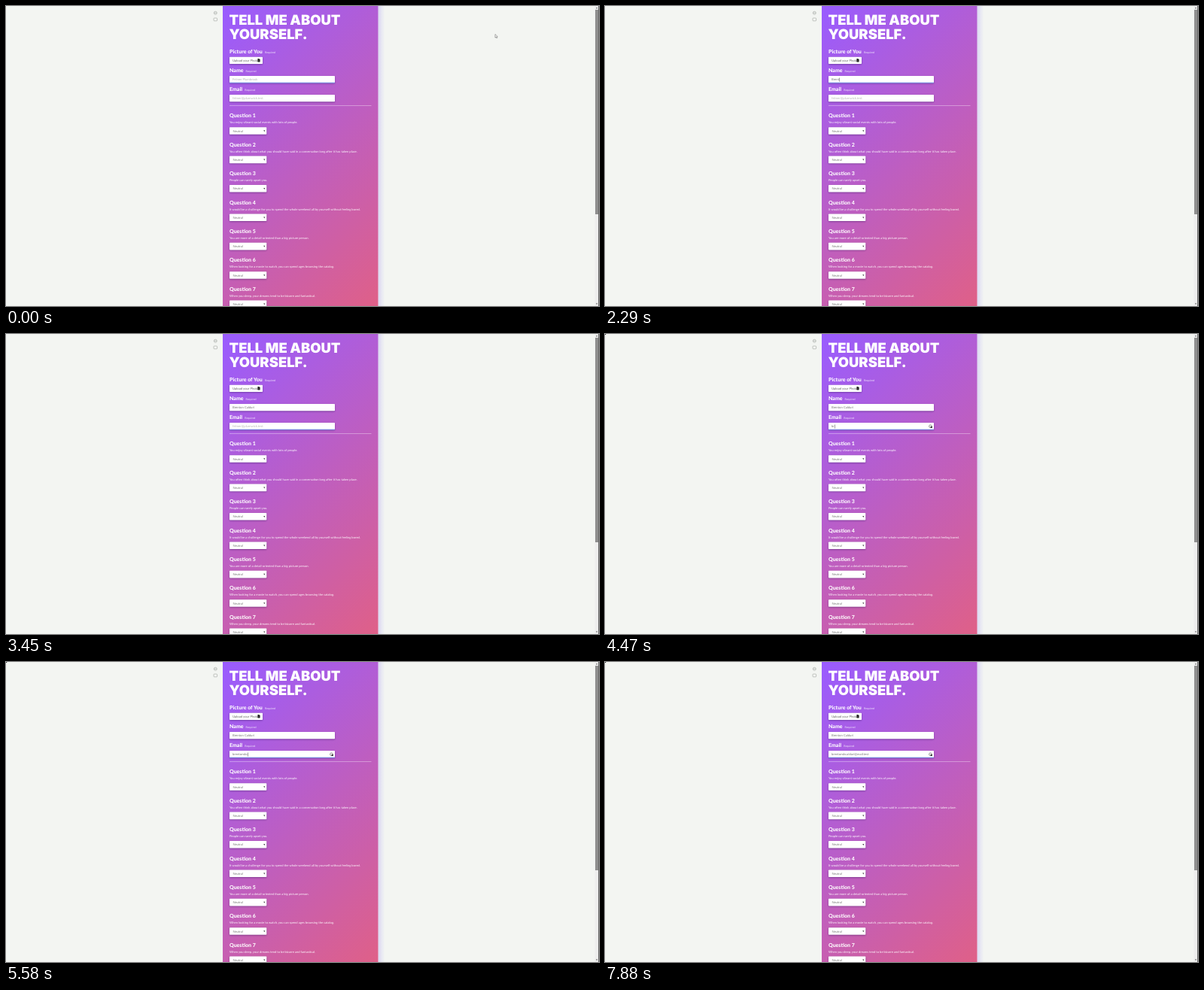
An HTML page with a canvas that plays this animation: 788 by 399 pixels, repeating every 8000 ms.

```html
<!DOCTYPE html>
<html lang="en">
<head>
<meta charset="utf-8">
<title>Tell me about yourself</title>
<style>
html, body { margin: 0; width: 100%; height: 100%; overflow: hidden; background: #f3f5f2; }
canvas { display: block; width: 788px; height: 399px; }
</style>
</head>
<body>
<canvas id="stage"></canvas>
<script>
const W = 788, H = 399, LOOP = 8000;
const PANEL = { x: 288, w: 206.5, h: 570 };
const LEFT = 297;
const BODY = 'Lato, "Open Sans", sans-serif';
const TITLE = 'Inter, "Open Sans", sans-serif';

const questions = [
  'You enjoy vibrant social events with lots of people.',
  'You often think about what you should have said in a conversation long after it has taken place.',
  'People can rarely upset you.',
  'It would be a challenge for you to spend the whole weekend all by yourself without feeling bored.',
  'You are more of a detail-oriented than a big picture person.',
  'When looking for a movie to watch, you can spend ages browsing the catalog.',
  'When you sleep, your dreams tend to be bizarre and fantastical.'
];

// Typing schedules: [time in ms, number of characters shown]
const nameField = {
  y: 93, text: 'Brenton Calduri', hint: 'Felmer Plumbrook',
  keys: [[1560, 1], [1970, 2], [2130, 4], [2290, 5], [2490, 6], [2620, 8],
         [3040, 9], [3180, 11], [3320, 13], [3450, 15]]
};
const emailField = {
  y: 118, text: 'brentonskcalduri@mail.test', hint: 'felmer@plumwick.test',
  keys: [[3950, 1], [4470, 2], [4680, 3], [4850, 5], [5020, 6], [5200, 7], [5380, 9],
         [5580, 10], [5710, 11], [5870, 13], [6030, 14], [6190, 16],
         [6590, 17], [6750, 18], [6910, 19], [7200, 21], [7330, 23], [7470, 26]]
};
const SWITCH = 3450, ICON_ON = 3950, CARET_OFF = 7880;
const moves = [[0, 0], [400, 0.16], [520, 0.48], [660, 0.8], [810, 0.97]];
const CLICK = 970, CLICK_END = 1130;

const canvas = document.getElementById('stage');
const scale = window.devicePixelRatio || 1;
canvas.width = W * scale;
canvas.height = H * scale;
const ctx = canvas.getContext('2d');

function stepAt(steps, t, start = 0) {
  let value = start;
  for (const [time, v] of steps) if (t >= time) value = v;
  return value;
}

function rect(x, y, w, h, color) {
  ctx.fillStyle = color;
  ctx.fillRect(x, y, w, h);
}

function text(str, x, y, size, color, weight = 400, family = BODY) {
  ctx.font = `${weight} ${size}px ${family}`;
  ctx.fillStyle = color;
  ctx.fillText(str, x, y);
}

function box(x, y, w, h) {
  ctx.save();
  ctx.shadowColor = 'rgba(50, 20, 90, 0.45)';
  ctx.shadowBlur = 2.5 * scale;
  ctx.shadowOffsetY = 0.9 * scale;
  ctx.fillStyle = '#fff';
  ctx.beginPath();
  ctx.roundRect(x, y, w, h, 0.8);
  ctx.fill();
  ctx.restore();
}

function path(points, fill, stroke, width = 0.5) {
  ctx.beginPath();
  points.forEach(([x, y], i) => i ? ctx.lineTo(x, y) : ctx.moveTo(x, y));
  ctx.closePath();
  if (fill) { ctx.fillStyle = fill; ctx.fill(); }
  if (stroke) { ctx.strokeStyle = stroke; ctx.lineWidth = width; ctx.stroke(); }
}

function label(str, y, noteX) {
  text(str, LEFT, y, 7, '#fff', 800);
  text('Required', noteX, y - 0.2, 3.6, 'rgba(255,255,255,0.85)');
}

function drawPanel() {
  const { x, w, h } = PANEL;
  const right = x + w;
  const shade = ctx.createLinearGradient(right, 0, right + 9, 0);
  shade.addColorStop(0, '#d9d6f2');
  shade.addColorStop(0.55, '#e9e9f3');
  shade.addColorStop(1, '#f3f5f2');
  rect(right, 0, 9, H, shade);

  // 135 degree gradient over the full form height
  const d = (w + h) / 4;
  const cx = x + w / 2, cy = h / 2;
  const fill = ctx.createLinearGradient(cx - d, cy - d, cx + d, cy + d);
  fill.addColorStop(0, '#995cff');
  fill.addColorStop(1, '#f36166');
  rect(x, 0, w, H, fill);
}

function drawChrome() {
  rect(782.5, 0, 5.5, H, '#eeeeee');
  rect(783, 5, 4, 272, '#8f8f8f');
  rect(787.2, 0, 0.8, H, '#4b4b4b');
  path([[783.8, 3.2], [785, 1.8], [786.2, 3.2]], '#555');
  path([[783.8, 395.6], [785, 397], [786.2, 395.6]], '#555');

  ctx.strokeStyle = '#aaaeaa';
  ctx.lineWidth = 0.7;
  ctx.beginPath();
  ctx.arc(278.3, 9.2, 2, 0, Math.PI * 2);
  ctx.moveTo(276.5, 9.2);
  ctx.lineTo(280.1, 9.2);
  ctx.stroke();
  ctx.beginPath();
  ctx.roundRect(276, 16, 4.6, 3.8, 0.8);
  ctx.stroke();
}

function drawForm() {
  text('TELL ME ABOUT', 296.5, 25, 18.4, '#fff', 900, TITLE);
  text('YOURSELF.', 296.5, 44, 18.4, '#fff', 900, TITLE);

  label('Picture of You', 63, 344);
  box(LEFT, 67.7, 44, 9.4);
  text('Upload your Photo', 301, 74, 4.2, '#666');
  path([[334.4, 70], [336.4, 70], [337.6, 71.2], [337.6, 74.6], [334.4, 74.6]], '#2a2a2a');
  label('Name', 88.2, 318.5);
  label('Email', 113.2, 317.3);
  rect(LEFT, 132, 188.5, 0.7, 'rgba(255,255,255,0.5)');

  questions.forEach((q, i) => {
    const y = 146 + i * 38.4;
    text(`Question ${i + 1}`, LEFT, y + 2.4, 7, '#fff', 800);
    text(q, LEFT, y + 10.4, 4.1, 'rgba(255,255,255,0.95)');
    box(LEFT, y + 15.2, 49.3, 9.6);
    text('Neutral', 301.4, y + 21.5, 4.1, '#777');
    path([[342.2, y + 19.2], [344.4, y + 19.2], [343.3, y + 21.2]], '#444');
  });
}

function drawField(field, t, focused) {
  const { y } = field;
  const count = stepAt(field.keys, t);
  box(LEFT, y, 140, 9.3);
  if (focused) rect(LEFT, y + 8.7, 140, 0.8, '#5b7fe8');

  const shown = count ? field.text.slice(0, count) : field.hint;
  text(shown, 301, y + 6.1, 4.2, count ? '#777' : '#b8b8b8');
  if (focused && count && t < CARET_OFF) {
    rect(301.2 + ctx.measureText(shown).width, y + 2.5, 0.5, 5, '#444');
  }
}

function drawPointer(t) {
  if (t < CLICK) {
    const k = stepAt(moves, t);
    const x = 650 - 285 * k, y = 37.6 + 59 * k;
    path([[x, y], [x, y + 4.6], [x + 1.1, y + 3.6], [x + 1.9, y + 5.2],
          [x + 2.6, y + 4.8], [x + 1.9, y + 3.3], [x + 3.3, y + 3.2]], '#fff', '#555', 0.5);
  } else if (t < CLICK_END) {
    ctx.strokeStyle = '#c2213f';
    ctx.lineWidth = 1.2;
    ctx.beginPath();
    ctx.arc(365.5, 96.8, 9.8, 0, Math.PI * 2);
    ctx.stroke();
  }
}

function drawFieldIcon() {
  rect(0, 0, 1.2, 0.9, '#111');
  ctx.strokeStyle = '#777';
  ctx.lineWidth = 0.8;
  ctx.beginPath();
  ctx.arc(432.4, 122.7, 1.8, 0, Math.PI * 2);
  ctx.stroke();
  rect(432.6, 122.8, 2.2, 2.2, '#333');
}

function draw(now) {
  const t = now % LOOP;
  ctx.setTransform(scale, 0, 0, scale, 0, 0);
  ctx.textRendering = 'geometricPrecision';
  rect(0, 0, W, H, '#f3f5f2');
  drawPanel();
  drawChrome();
  drawForm();
  drawField(nameField, t, t < SWITCH);
  drawField(emailField, t, t >= SWITCH);
  if (t >= ICON_ON) drawFieldIcon();
  drawPointer(t);
  requestAnimationFrame(draw);
}

requestAnimationFrame(draw);
</script>
</body>
</html>
```
